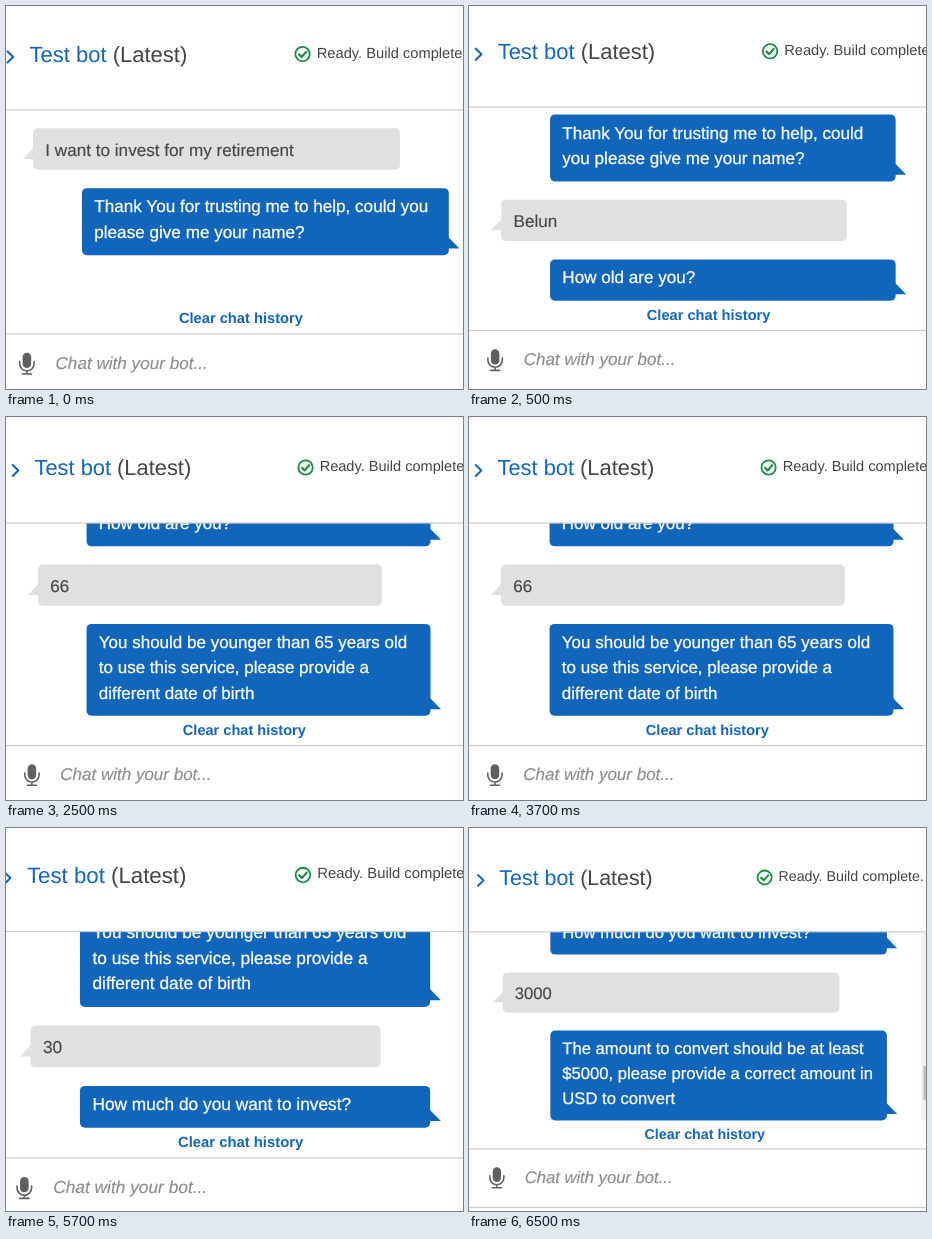
An HTML page for the animation above (8000 ms loop, 457 by 383 pixels).

```html
<!DOCTYPE html>
<html lang="en">
<head>
<meta charset="utf-8">
<title>Chat bot test window</title>
<style>
  html, body { margin: 0; width: 100%; height: 100%; overflow: hidden; background: #fff; }
  svg { display: block; width: 457px; height: 383px; }
  text {
    font-family: "Liberation Sans", Arial, sans-serif;
    font-size: 14px;
    fill: #444;
    white-space: pre;
    text-rendering: geometricPrecision;
  }
  .title { font-size: 18px; }
  .small { font-size: 12px; }
  .link { fill: #16b; }
  .bold { font-weight: bold; }
  .hint { fill: #8c8c8c; stroke: #8c8c8c; stroke-width: 0.12; font-style: italic; }
  .bot { fill: #16b; }
  .bot text { fill: #fff; stroke: #fff; stroke-width: 0.22; }
  .user { fill: #e0e0e0; }
  .user text { stroke: #444; stroke-width: 0.12; }
  .line { fill: none; stroke-linecap: round; stroke-linejoin: round; }
</style>
</head>
<body>
<svg id="stage" viewBox="0 0 457 383"></svg>
<script>
const stage = document.getElementById("stage");
const LOOP = 8000;
const LINE = 20.9, GAP = 15, VIEW = 158.8;

const bot = (...lines) => ({ who: "bot", lines });
const user = (...lines) => ({ who: "user", lines });

const opening = [
  user("I want to invest for my retirement"),
  bot("Thank You for trusting me to help, could you", "please give me your name?")
];
const chat = [
  bot("Thank You for trusting me to help, could", "you please give me your name?"),
  user("Belun"),
  bot("How old are you?"),
  user("66"),
  bot("You should be younger than 65 years old", "to use this service, please provide a", "different date of birth"),
  user("30"),
  bot("How much do you want to invest?"),
  user("3000"),
  bot("The amount to convert should be at least", "$5000, please provide a correct amount in", "USD to convert")
];

// x: left edge of user bubbles; top, bottom: the two divider lines
const scenes = [
  { end: 500, x: 27, top: 104, bottom: 328, scale: 1.223, width: 300, messages: opening },
  { end: 2500, x: 32.2, top: 101, bottom: 324.5, scale: 1.22, width: 283.3, messages: chat.slice(0, 3) },
  { end: 4500, x: 32, top: 106, bottom: 328.5, scale: 1.214, width: 283.3, messages: chat.slice(0, 5) },
  { end: 6500, x: 24.5, top: 103.5, bottom: 330, scale: 1.236, width: 283.3, messages: chat.slice(0, 7) },
  { end: LOOP, x: 33.8, top: 103.8, bottom: 321, scale: 1.188, width: 283.3, messages: chat }
];

const text = (x, y, content, cls = "") => `<text x="${x}" y="${y}" class="${cls}">${content}</text>`;
const rect = (x, y, w, h, fill) => `<rect x="${x}" y="${y}" width="${w}" height="${h}" fill="${fill}"/>`;
const divider = y => rect(-50, y - 0.5, 500, 1, "#ccc");
const place = (s, y, content) =>
  `<g transform="translate(${s.x} ${y}) scale(${s.scale})">${content}</g>`;

const height = message => 13 + LINE * message.lines.length;

function bubble({ who, lines }, y, width, h) {
  const isBot = who === "bot";
  const left = isBot ? 40 : 0;
  const edge = isBot ? left + width : 0;
  const foot = y + h - (isBot ? 5.4 : 8.8);
  const reach = isBot ? 8.7 : -8.3;
  const first = y + (isBot ? 19.7 : 22.4);
  const inner = edge - Math.sign(reach);
  return `<g class="${who}">
    <rect x="${left}" y="${y}" width="${width}" height="${h}" rx="4"/>
    <path d="M${inner} ${foot - 9.4}L${edge} ${foot - 8.8}L${edge + reach} ${foot}H${inner}Z"/>
    ${lines.map((line, i) => text(left + 10.1, first + i * LINE, line)).join("")}
  </g>`;
}

function conversation({ messages, width }) {
  const total = messages.reduce((sum, m) => sum + height(m) + GAP, -GAP);
  let y = Math.min(GAP, VIEW - total);
  return messages.map(m => {
    const h = height(m);
    const shape = bubble(m, y, width, h);
    y += h + GAP;
    return shape;
  }).join("");
}

const scrollbar = rect(352, 0, 17, VIEW, "#f1f1f1") + rect(354, 113, 13, 28.5, "#c1c1c1");

const header = `
  <path class="line" d="M-20.8 -47.8l4.6 4.5l-4.6 4.5" stroke="#16b" stroke-width="1.7"/>
  <text x="-2.9" y="-39.5" class="title"><tspan class="link">Test bot</tspan> (Latest)</text>
  <g class="line" transform="translate(220.4 -45.7)" stroke="#1d8d46">
    <circle r="5.9" stroke-width="1.5"/>
    <path d="M-2.9 0.2l2.1 2.2l3.8 -4.2" stroke-width="1.8"/>
  </g>
  ${text(232, -42.9, "Ready. Build complete.", "small")}
  ${divider(0)}`;

const footer = `
  ${text(119.3, -8.6, "Clear chat history", "small link bold")}
  ${divider(0)}
  <g transform="translate(-5 15.4)">
    <rect x="-3.5" width="7" height="12.4" rx="3.5" fill="#606060"/>
    <path class="line" d="M-5.9 7.2v1.6a5.9 5.9 0 0 0 11.8 0v-1.6M0 14.8v2.4M-3.8 17.3h7.6" stroke="#606060" stroke-width="1.3"/>
  </g>
  ${text(18.4, 28.5, "Chat with your bot...", "hint")}
  ${divider(49.2)}`;

function draw(s) {
  const clip = `<clipPath id="view"><rect y="${s.top}" width="457" height="${VIEW * s.scale + 1}"/></clipPath>`;
  const bar = s.messages === opening ? "" : scrollbar;
  stage.innerHTML = clip +
    `<g clip-path="url(#view)">${place(s, s.top, bar + conversation(s))}</g>` +
    place(s, s.top, header) +
    place(s, s.bottom, footer);
}

let current;
function tick() {
  const time = performance.now() % LOOP;
  const scene = scenes.find(s => time < s.end);
  if (scene !== current) draw(current = scene);
  requestAnimationFrame(tick);
}
tick();
</script>
</body>
</html>
```
